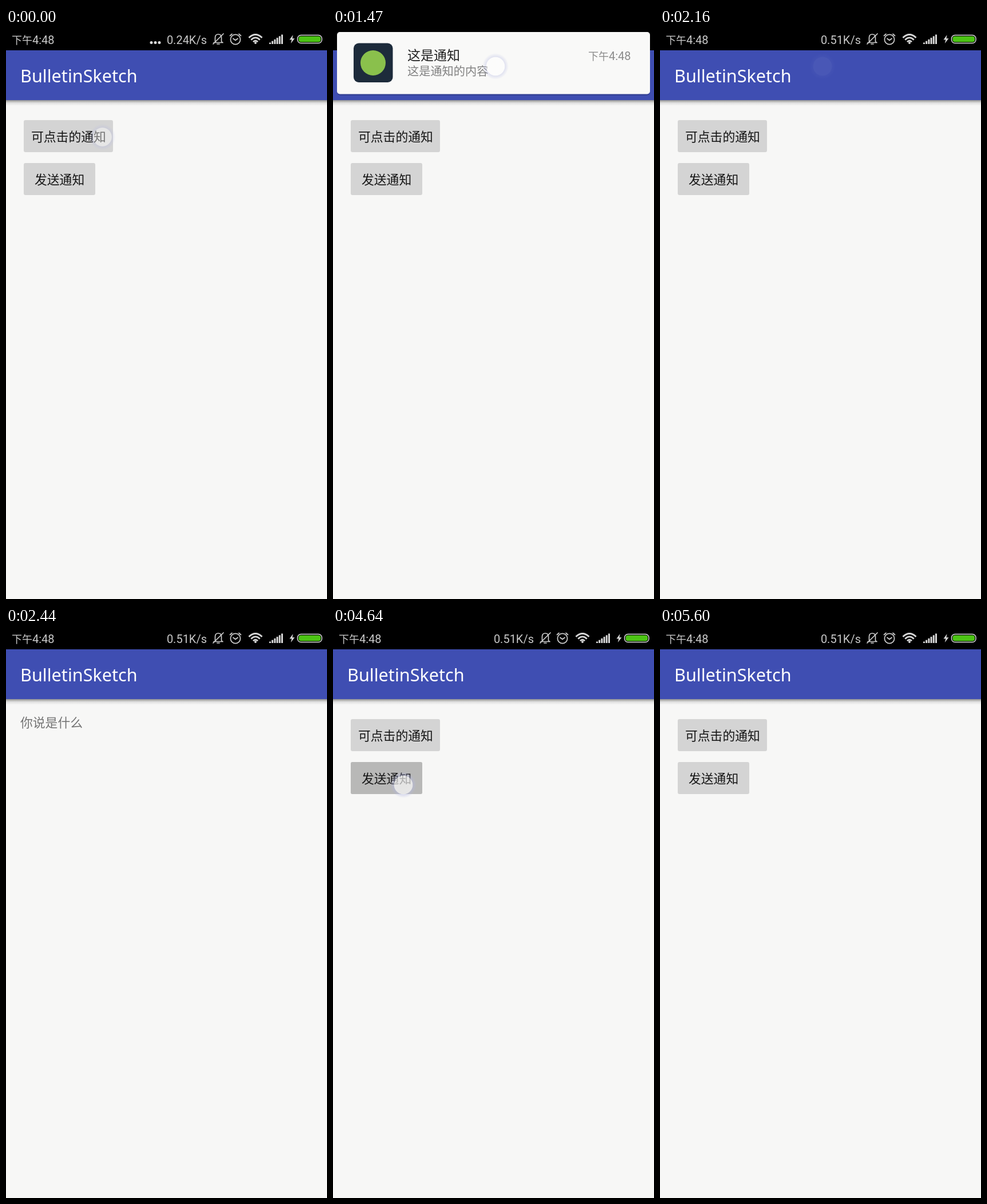
Recreate the animation shown at these times as an HTML page. Size 561 by 998 pixels, loop 5.68 s.

```html
<!DOCTYPE html>
<html lang="zh">
<head>
<meta charset="utf-8">
<title>Notification demo</title>
<style>
html, body { margin: 0; width: 100%; height: 100%; overflow: hidden; background: #f7f7f6; }
svg { display: block; width: 100%; height: 100%; }
text { font-family: "Noto Sans CJK SC", "Noto Sans CJK", "Noto Sans CJK JP", sans-serif; }
.num { font-family: Roboto, sans-serif; font-size: 20px; }
.title { font-family: "Noto Sans", sans-serif; font-size: 30.6px; fill: #fff; }
.btn { font-size: 21.8px; fill: #161616; }
.line { fill: none; stroke: #d0d0d0; stroke-width: 1.7; stroke-linecap: round; stroke-linejoin: round; }
</style>
</head>
<body>
<svg viewBox="0 0 561 998">
  <defs>
    <linearGradient id="drop" x1="0" y1="0" x2="0" y2="1">
      <stop offset="0" stop-color="#000" stop-opacity=".42"/>
      <stop offset=".2" stop-color="#000" stop-opacity=".28"/>
      <stop offset=".5" stop-color="#000" stop-opacity=".09"/>
      <stop offset="1" stop-color="#000" stop-opacity="0"/>
    </linearGradient>
    <radialGradient id="glow">
      <stop offset="0" stop-color="#fff" stop-opacity=".95"/>
      <stop offset=".69" stop-color="#fff"/>
      <stop offset=".73" stop-color="#b4b8e2" stop-opacity=".65"/>
      <stop offset="1" stop-color="#b4b8e2" stop-opacity="0"/>
    </radialGradient>
    <g id="clock">
      <text font-size="18" x="0" y="-.5">下午</text>
      <text class="num" x="36" y="0">4:48</text>
    </g>
  </defs>

  <rect width="561" height="998" fill="#f7f7f6"/>

  <g id="home">
    <rect x="31" y="161" width="156" height="56" rx="3" fill="#d4d4d4"/>
    <text class="btn" x="44" y="197.7">可点击的通知</text>
    <rect x="31" y="236" width="125" height="56" rx="3" fill="#d4d4d4"/>
    <rect id="press" x="31" y="236" width="125" height="56" rx="3" fill="#b8b8b7"/>
    <text class="btn" x="50" y="272.7">发送通知</text>
  </g>
  <text id="detail" x="25" y="174.8" font-size="21.8" fill="#737373">你说是什么</text>

  <rect y="126" width="561" height="10" fill="url(#drop)"/>
  <rect y="39" width="561" height="87" fill="#3f4eb2"/>
  <text class="title" x="25" y="95">BulletinSketch</text>

  <rect width="561" height="39" fill="#000"/>
  <use href="#clock" x="10" y="28" fill="#c9c9c9"/>
  <g id="dots" fill="#dadada">
    <circle cx="254" cy="25.5" r="2.5"/><circle cx="261" cy="25.5" r="2.5"/><circle cx="268" cy="25.5" r="2.5"/>
  </g>
  <text id="speed" class="num" x="351" y="28" text-anchor="end" fill="#c9c9c9"></text>

  <g class="line">
    <path d="M363 25.5H379M365.5 23.5V17Q365.5 11 371 11Q376.5 11 376.5 17V23.5L378.5 25.5M369 28H373M380 10L362 28"/>
    <circle cx="401" cy="20" r="8.6"/>
    <path d="M397 18.5L401 21.5L405 18.5M391.5 13.5L395 10.5M410.5 13.5L407 10.5"/>
  </g>
  <path d="M424.5 17Q436 6 447.5 17M428.3 20.8Q436 13 443.7 20.8M432 24.3Q436 20.3 440 24.3" fill="none" stroke="#d6d6d6" stroke-width="2.9"/>
  <circle cx="436" cy="26" r="2" fill="#d6d6d6"/>
  <g id="bars" fill="#d6d6d6"></g>
  <path d="M501.5 12L495.5 20.5H499.3L497.8 27L504.5 18.3H500.5Z" fill="#d6d6d6"/>
  <rect x="509.5" y="12.5" width="42.5" height="14" rx="6" fill="#000" stroke="#d9d9d9" stroke-width="1.5"/>
  <rect x="511.5" y="14.5" width="38.5" height="10" rx="4" fill="#4cc414"/>

  <g id="card">
    <rect x="7" y="9" width="547" height="109" rx="6" fill="#000" opacity=".16"/>
    <rect x="7" y="7" width="547" height="108.5" rx="5" fill="#f9f9f8"/>
    <rect x="36" y="26.5" width="68.5" height="68.5" rx="9" fill="#1d2b3b"/>
    <circle cx="70" cy="61" r="22" fill="#8ac04c"/>
    <text x="130" y="56.3" font-size="23" fill="#202020">这是通知</text>
    <text x="130" y="83" font-size="20.2" fill="#808080">这是通知的内容</text>
    <use href="#clock" x="446" y="56" fill="#8c8c8c"/>
  </g>
  <circle id="touch" r="23" fill="url(#glow)"/>
</svg>
<script>
const LOOP = 5680;
const $ = id => document.getElementById(id);
const ramp = (t, a, b) => Math.min(1, Math.max(0, (t - a) / (b - a)));
const ease = k => k * k * (3 - 2 * k);
const show = (id, v) => $(id).setAttribute("opacity", v);

const taps = [
  { x: 168.5, y: 190.5, down: -500, up: 100, end: 420, peak: .42 },
  { x: 284, y: 67, down: 1390, up: 1500, end: 2220, peak: .66 },
  { x: 123, y: 276, down: 4330, up: 4990, end: 5500, peak: .66 }
];

for (let i = 0; i < 6; i++) {
  const h = 2.5 + i * 2.8;
  $("bars").innerHTML += `<rect x="${460 + i * 4.2}" y="${28 - h}" width="3" height="${h}"/>`;
}

function draw(t) {
  const page = t < 2340 || t >= 3690 ? 0 : t < 2440 ? .5 : 1;
  show("home", 1 - page);
  show("detail", page);
  show("card", ease(ramp(t, 100, 470)) * (1 - ease(ramp(t, 1470, 1670))));
  show("press", ease(ramp(t, 4380, 4630)) * (1 - ease(ramp(t, 4990, 5300))));
  show("dots", t < 890 || (t >= 5150 && t < 5600) ? 1 : 0);
  $("speed").textContent = t < 890 ? "0.24K/s" : "0.51K/s";

  const tap = taps.find(p => t >= p.down && t < p.end);
  show("touch", tap ? tap.peak * ramp(t, tap.down - 30, tap.down + 110) * (1 - ramp(t, tap.up, tap.end)) : 0);
  if (tap) $("touch").setAttribute("transform", `translate(${tap.x} ${tap.y})`);
}

const start = performance.now();
function tick() {
  draw((performance.now() - start) % LOOP);
  requestAnimationFrame(tick);
}
draw(0);
requestAnimationFrame(tick);
</script>
</body>
</html>
```
